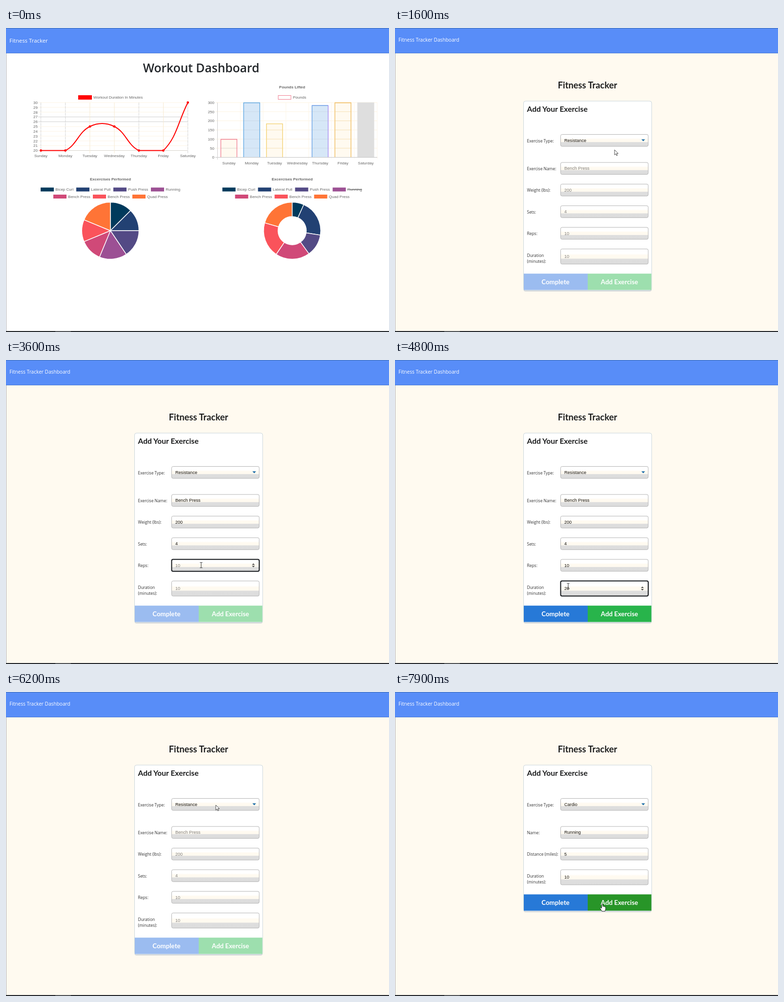
Write an HTML page that moves like this. It is 785x624 px and loops after 8000 ms.

```html
<!DOCTYPE html>
<html lang="en">
<head>
<meta charset="utf-8">
<title>Fitness Tracker</title>
<style>
  html, body { margin: 0; width: 100%; height: 100%; overflow: hidden; }
  svg { display: block; width: 100%; height: 100%; }
  text { white-space: pre; }
</style>
</head>
<body>
<svg id="stage" viewBox="0 0 785 624"></svg>
<script>
const LOOP = 8000, STEP = 100;
const UI = "'Open Sans', sans-serif";
const LATO = "Lato, sans-serif";
const ARIAL = "'Liberation Sans', Arial, sans-serif";
const CREAM = "#fffaf0", BLUE = "#2779d7";
const DAYS = ["Sunday", "Monday", "Tuesday", "Wednesday", "Thursday", "Friday", "Saturday"];

const text = (x, y, str, size, { font = UI, fill = "#212529", weight = 400, anchor = "start" } = {}) =>
  `<text x="${x}" y="${y}" font-family="${font}" font-size="${size}" font-weight="${weight}" fill="${fill}" text-anchor="${anchor}">${str}</text>`;
const rect = (x, y, w, h, fill, extra = "") =>
  `<rect x="${x}" y="${y}" width="${w}" height="${h}" fill="${fill}" ${extra}/>`;
const path = (d, fill, extra = "") => `<path d="${d}" fill="${fill}" ${extra}/>`;
const line = (x1, y1, x2, y2, stroke, extra = "") =>
  path(`M${x1} ${y1}L${x2} ${y2}`, "none", `stroke="${stroke}" ${extra}`);
const chartText = (x, y, str, anchor = "middle", weight = 400) =>
  text(x, y, str, 8, { font: ARIAL, fill: "#666", anchor, weight });
const heading = (x, y, str, size, anchor = "middle", fill = "#1b1c1d") =>
  text(x, y, str, size, { font: LATO, weight: 700, anchor, fill });

function page(background, title, titleY, titleSize) {
  return rect(0, 0, 785, 624, background) +
    rect(0, 0, 785, 52, "#588df8") + rect(0, 0, 785, 1, "#3b6cb4") + rect(0, 51, 785, 1, "#4a7cd6") +
    rect(0, 52, 1, 570, "#b4b4ba") +
    rect(0, 622, 785, 2, "#1d2126") + rect(101, 622, 32, 2, "#4a4e52") +
    text(7, titleY, title, titleSize, { fill: "#fff" });
}

/* ---------- dashboard ---------- */

function lineChart() {
  const top = 153, bottom = 251.5, unit = (bottom - top) / 10;
  const points = [20, 20, 25, 25, 20, 20, 30].map((v, i) => [71.5 + i * 50.2, bottom - (v - 20) * unit]);
  let out = "";
  for (let v = 20; v <= 30; v++) {
    const y = bottom - (v - 20) * unit;
    const color = v === 26 || v === 27 ? "#cfcfcf" : v === 20 ? "#d8d4cc" : "#fdf4e4";
    out += line(66, y, 372.5, y, color) + chartText(65, y + 2.8, v, "end");
  }
  points.forEach(([x], i) => {
    const dotted = i === 2 || i === 3 || i === 5;
    out += line(x, top, x, 257, dotted ? "#f6ead2" : "#d4d4d4", dotted ? "" : 'stroke-dasharray="6 1"') +
      chartText(x, 265, DAYS[i]);
  });
  // Spline handles lean along the chord between both neighbours, kept inside the chart.
  const clamp = y => Math.min(bottom, Math.max(top, y));
  const handle = (i, dir) => {
    const p = points[i], a = points[i - 1] || p, b = points[i + 1] || p;
    const before = Math.hypot(p[0] - a[0], p[1] - a[1]), after = Math.hypot(b[0] - p[0], b[1] - p[1]);
    const k = 0.4 * dir * (dir < 0 ? before : after) / (before + after);
    return [p[0] + k * (b[0] - a[0]), clamp(p[1] + k * (b[1] - a[1]))];
  };
  const curve = points.map((p, i) => i ? `C${handle(i - 1, 1)} ${handle(i, -1)} ${p}` : `M${p}`).join("");
  return out + path(curve, "none", 'stroke="#f00" stroke-width="2"') +
    points.map(([x, y]) => `<circle cx="${x}" cy="${y}" r="2.4" fill="#f00"/>`).join("") +
    rect(148, 138, 28, 9, "#f00") + chartText(179, 145, "Workout Duration In Minutes", "start");
}

function barChart() {
  const left = 433.5, base = 265.5, slot = 46.75, scale = 112.5 / 300;
  const bars = [
    [100, CREAM, "#f07f92"], [300, "#d6e7f7", "#5fa9e3"], [185, CREAM, "#f2cf6b"], [0],
    [285, "#d6e7f7", "#a58af0"], [300, CREAM, "#efb95a"], [300, "#dedede", "#dedede"]
  ];
  let out = "", grid = "";
  for (let v = 0; v <= 300; v += 50) {
    const y = base - v * scale;
    grid += line(429, y, 761, y, "#fdf3e0");
    out += chartText(427, y + 2.8, v, "end");
  }
  bars.forEach(([value, fill, stroke], i) => {
    const x = left + slot * (i + 0.5), h = value * scale, y = base - h;
    grid += line(left + slot * (i + 1), 153, left + slot * (i + 1), 269, "#fcf5e8");
    out += chartText(x, 279.5, DAYS[i]);
    if (!value) return;
    out += rect(x - 17, y, 34, h, fill);
    if (i < 6) for (let v = 50; v < value; v += 50)
      out += line(x - 16, base - v * scale, x + 16, base - v * scale, i === 1 || i === 4 ? "#c9d9e8" : i ? "#f5dfb4" : "#dcd6cf");
    out += path(`M${x - 16.5} ${base}V${y + .5}H${x + 16.5}V${base}`, "none", `stroke="${stroke}" stroke-width="1.3"`);
    if (i === 4) out += path(`M${x - 16.5} ${base}V${y + .5}H${x + 16}`, "none", 'stroke="#6fb0e6" stroke-width="1.3"');
  });
  return grid + out + line(429, base, 761, base, "#c4c4c4") + line(left, 153, left, 270, "#cfcfcf") +
    chartText(586.5, 123.5, "Pounds Lifted", "middle", 700) +
    rect(558, 138.5, 26, 8, "#fff", 'stroke="#f07f92"') + chartText(588, 145, "Pounds", "start");
}

const SLICES = ["#003a5c", "#224173", "#534a85", "#9c5094", "#d04978", "#fa535b", "#ff7436"];
const EXERCISES = ["Bicep Curl", "Lateral Pull", "Push Press", "Running", "Bench Press", "Bench Press", "Quad Press"];
const LEGEND_X = [71, 144, 220, 297, 97, 178, 259];

function roundChart(dx, degrees, hole) {
  const cx = 214 + dx, cy = 416, r = 58.5;
  const at = (deg, radius) => {
    const a = deg * Math.PI / 180;
    return `${cx + radius * Math.sin(a)} ${cy - radius * Math.cos(a)}`;
  };
  let out = chartText(cx, 313, "Excercises Performed", "middle", 700), from = 0;
  degrees.forEach((size, i) => {
    const x = LEGEND_X[i] + dx, y = i < 4 ? 327.5 : 342, to = from + size;
    out += rect(x, y, 27, 8, SLICES[i]) + chartText(x + 30.3, y + 6.8, EXERCISES[i], "start");
    if (size) out += path(`M${at(from, hole)}L${at(from, r)}A${r} ${r} 0 0 1 ${at(to, r)}L${at(to, hole)}` +
      (hole ? `A${hole} ${hole} 0 0 0 ${at(from, hole)}Z` : "Z"), SLICES[i], 'stroke="#fff" stroke-width="1.4"');
    else out += line(x + 30, y + 4, x + 60, y + 4, "#666");
    from = to;
  });
  return out;
}

const dashboard = () => page("#fff", "Fitness Tracker", 30, 11.4) +
  text(400, 91, "Workout Dashboard", 24.6, { weight: 600, anchor: "middle" }) +
  lineChart() + barChart() +
  roundChart(0, [45, 45, 56.25, 56.25, 45, 45, 67.5], 0) +
  roundChart(372.5, [24, 75, 45, 0, 70, 72, 74], 29);

/* ---------- last workout ---------- */

const trackerPage = () => page(CREAM, "Fitness Tracker Dashboard", 27.5, 10.15) +
  heading(394.5, 123.5, "Fitness Tracker", 18.3);

const card = (x, w, h) => rect(x, 151, w, h + 1, "#d3d6d8", 'rx="4"') +
  rect(x, 150, w, h, "#fff", 'rx="4" stroke="#cbd6dc"');

function home(t) {
  const facts = [["Date", "9/22/2020"], ["Total Workout Duration", 20], ["Exercises Performed", 1],
    ["Total Weight Lifted", 300], ["Total Sets Performed", 4], ["Total Reps Performed", 10]];
  return trackerPage() + card(231.5, 327, 209) +
    heading(394.5, 185, "Last Workout", 18.7) +
    facts.map(([name, value], i) => text(394.8, 208.8 + i * 15.7,
      `<tspan font-weight="700" fill="#1b1c1d">${name}</tspan>: ${value}`, 8.5, { anchor: "middle", fill: "#333" })).join("") +
    rect(231.5, 309.5, 164, 49, BLUE) + rect(395.5, 309.5, 163, 49, t < 800 ? "#28b44b" : "#09ad2a") +
    heading(313, 331.7, "Continue Workout", 13.4, "middle", "#fff") +
    heading(476.3, 331.7, "New Workout", 13.4, "middle", "#fff") +
    (t < 900 ? "" : rect(0, 609, 266, 14, "#dedede") +
      text(3, 619.5, "Waiting for peaceful-orchards-27416.webhosts.test...", 7.1, { fill: "#555" }));
}

/* ---------- exercise form ---------- */

const field = (label, value, focus, typing, hint = value) => ({ label, value, focus, typing, hint });
const RESISTANCE = [
  field("Exercise Name:", "Bench Press", [1800, 2500], [1900, 2200]),
  field("Weight (lbs):", "200", [2500, 3200], [2600, 2800]),
  field("Sets:", "4", [3200, 3600], [3400, 3400]),
  field("Reps:", "10", [3600, 4100], [3700, 3800]),
  field("Duration (minutes):", "20", [4100, 5400], [4300, 4400], "10")
];
const CARDIO = [
  field("Name:", "Running", [6400, 6700], [6500, 6600]),
  field("Distance (miles):", "5", [6700, 7200], [6900, 6900]),
  field("Duration (minutes):", "10", [7200, 7700], [7300, 7400])
];

function typed({ value, typing: [from, to] }, t) {
  const share = t < from ? 0 : Math.min(1, (t - from + STEP) / (to - from + STEP));
  return value.slice(0, Math.ceil(value.length * share));
}

function inputBox(y, h, value, { focused = false, faded = false } = {}) {
  return rect(339.5, y, 179.5, h, "url(#inputFill)",
      `rx="3" stroke="${focused ? "#16191d" : "#b5b5b5"}" stroke-width="${focused ? 2 : 1}"`) +
    text(347, y + h / 2 + 3.1, value, 9.1, { font: ARIAL, fill: faded ? "#808080" : "#111" });
}

function formRow(f, y, t) {
  const cleared = t >= 5900 && f.focus[0] < 5900;
  const value = cleared ? "" : typed(f, t);
  const focused = t >= f.focus[0] && t < f.focus[1];
  const tall = f.label.startsWith("Duration"), h = tall ? 31 : 24.5;
  const labels = tall ? f.label.split(" ") : [f.label];
  const mid = y + h / 2;
  return labels.map((part, i) => text(270.5, y + 16 + i * 12.3, part, 8.45, { fill: "#333" })).join("") +
    inputBox(y, h, value || f.hint, { focused, faded: !value }) +
    (focused && !/Name/.test(f.label)
      ? path(`M504 ${mid - 1}h6l-3-3zM504 ${mid + 1}h6l-3 3z`, "#444") : "");
}

function addColor(t, enabled) {
  if (!enabled) return "#9ddfae";
  if (t >= 7900) return "#289528";
  if (t >= 5500 && t < 5900) return "#0a8a30";
  return t >= 5300 && t < 5900 ? "#16ab39" : "#28b44b";
}

function form(t) {
  const rows = t < 1600 ? [] : t < 6300 ? RESISTANCE : CARDIO;
  const rowY = i => 276 + i * 44.4;
  const enabled = t >= 4300 && t < 5900 || t >= 7300;
  const buttonsY = rows.length ? rowY(rows.length - 1) + 50.6 : 263;
  const kind = t < 1600 ? "Select Exercise Type" : t < 6300 ? "Resistance" : "Cardio";
  return trackerPage() + card(263.5, 262.5, buttonsY - 150 + 34.5) +
    heading(270.5, 172.3, "Add Your Exercise", 15.6, "start") +
    text(270.5, 234.5, "Exercise Type:", 8.45, { fill: "#333" }) +
    inputBox(218.5, 24.5, kind) + path("M505 228.5h7.5l-3.7 4z", "#176aa8") +
    rows.map((f, i) => formRow(f, rowY(i), t)).join("") +
    rect(264, buttonsY, 131, 33.5, enabled ? BLUE : "#9bbcf0") +
    rect(395, buttonsY, 130.5, 33.5, addColor(t, enabled)) +
    heading(329, buttonsY + 22, "Complete", 13.3, "middle", "#fff") +
    heading(460, buttonsY + 22, "Add Exercise", 13.3, "middle", "#fff");
}

/* ---------- pointer ---------- */

const POINTER = [
  [500, 60, 26, "hand"], [600, 110, 70, "arrow"], [800, 485, 327, "hand"], [1100, 484, 326, "arrow"],
  [1300, 455, 232, "arrow"], [1600, 450, 250, "arrow"], [1800, 449, 279, "beam"], [2300, 449, 279, "beam"],
  [2500, 448, 331, "beam"], [2900, 440, 334, "beam"], [3100, 425, 378, "beam"], [3500, 410, 381, "beam"],
  [3600, 400, 421, "beam"], [3800, 390, 425, "beam"], [4000, 370, 493, "arrow"], [4100, 360, 469, "beam"],
  [4800, 355, 464, "beam"], [5000, 385, 488, "arrow"], [5200, 425, 512, "hand"], [5400, 454, 526, "hand"],
  [5900, 454, 526, "arrow"], [6200, 430, 232, "arrow"], [6400, 390, 288, "beam"], [6600, 375, 289, "beam"],
  [6700, 352, 332, "beam"], [6900, 344, 338, "arrow"], [7000, 337, 343, "arrow"], [7200, 372, 381, "beam"],
  [7500, 378, 384, "beam"], [7700, 405, 411, "arrow"], [7800, 420, 431, "hand"], [7900, 425, 435, "hand"]
];
const SHAPES = {
  arrow: path("M0 0V10.5L2.5 8.2L4.1 12L5.8 11.3L4.2 7.6H7.4Z", "#fff", 'stroke="#222" stroke-width=".8"'),
  beam: path("M-2.5-5.5H-.6L0-5L.6-5.5H2.5M0-5V5M-2.5 5.5H-.6L0 5L.6 5.5H2.5", "none", 'stroke="#333"'),
  hand: path("M-1.4 8V1Q-1.4 0 -.3 0T.8 1V5Q2.5 4.2 3 5.4Q4.5 4.9 5 6Q6.7 5.7 6.7 7.5V10.5L5.4 15H-.8L-4.2 9.5Q-4.9 8 -3.6 7.7Q-2.6 7.5 -1.4 9Z",
    "#fff", 'stroke="#222" stroke-width=".9"')
};

function pointer(t) {
  const i = POINTER.findLastIndex(key => key[0] <= t);
  if (i < 0) return "";
  const [start, x, y, shape] = POINTER[i], [end, nextX, nextY] = POINTER[i + 1] || [LOOP, x, y];
  const k = (t - start) / (end - start);
  return `<g transform="translate(${x + (nextX - x) * k} ${y + (nextY - y) * k})">${SHAPES[shape]}</g>`;
}

/* ---------- playback ---------- */

const DEFS = `<defs><linearGradient id="inputFill" x2="0" y2="1">
  <stop stop-color="#fff"/><stop offset=".3" stop-color="#fff"/><stop offset=".42" stop-color="${CREAM}"/>
  <stop offset=".62" stop-color="${CREAM}"/><stop offset=".66" stop-color="#dedede"/><stop offset="1" stop-color="#dcdcdc"/>
</linearGradient></defs>`;
const stage = document.getElementById("stage");
let shown = -1;

function tick(now) {
  const t = Math.floor(now % LOOP / STEP) * STEP;
  if (t !== shown) {
    shown = t;
    const scene = t < 600 ? dashboard : t < 1100 ? home : form;
    stage.innerHTML = DEFS + scene(t) + pointer(t);
  }
  requestAnimationFrame(() => tick(performance.now()));
}
tick(performance.now());
</script>
</body>
</html>
```
